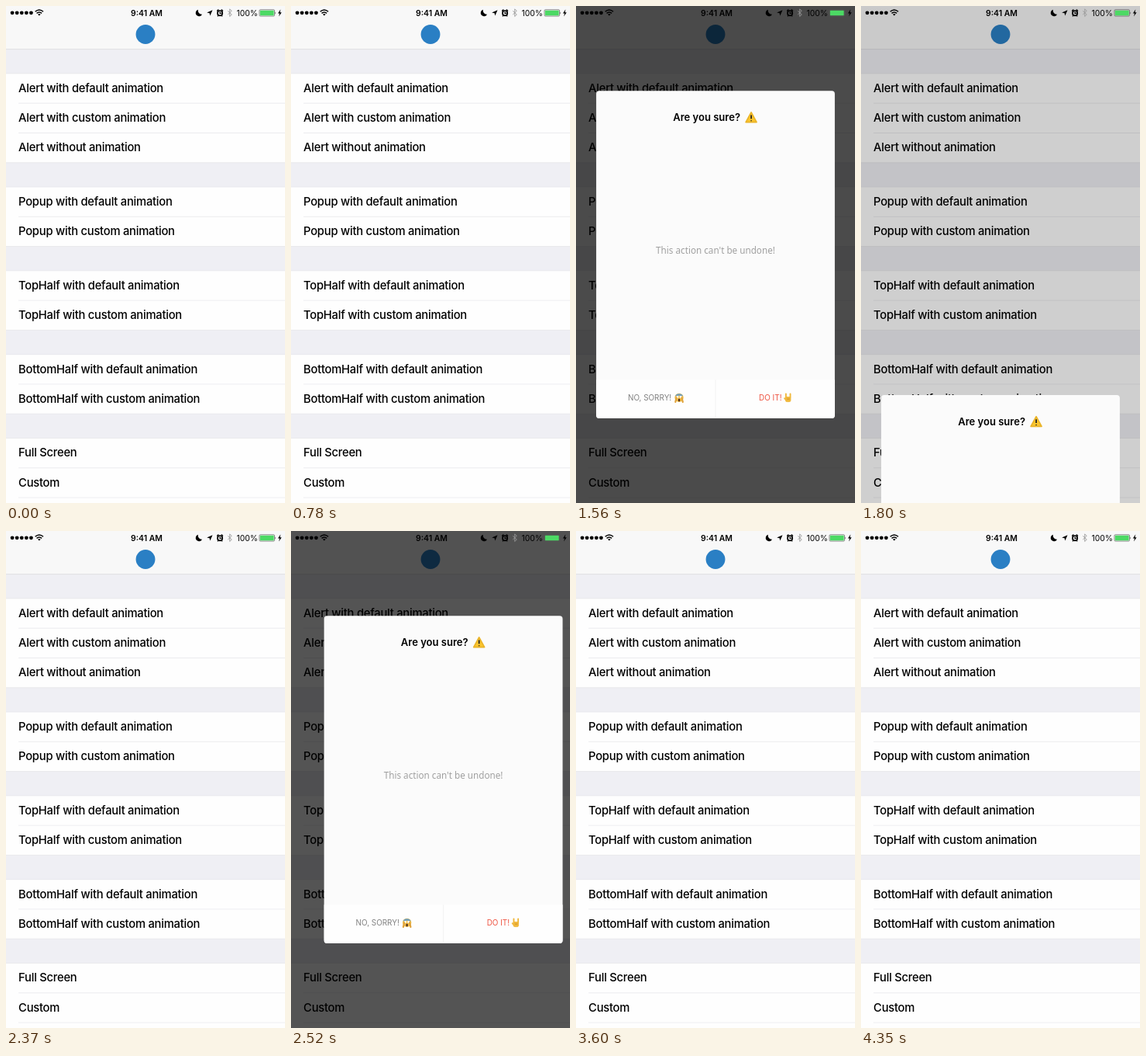
An HTML page for the animation above (4.38 s loop, 360 by 640 pixels).

```html
<!DOCTYPE html>
<html lang="en">
<head>
<meta charset="utf-8">
<title>Alert transitions</title>
<style>
  html, body { margin: 0; width: 100%; height: 100%; overflow: hidden; background: #fff; }
  svg { display: block; width: 100vw; height: 100vh; }
  text { font-family: Inter, "Liberation Sans", sans-serif; }
  .row { font-size: 17px; font-weight: 500; letter-spacing: -.29px; }
  .title { font-size: 15px; font-weight: 600; }
  .body { font: 13.45px "Noto Sans", sans-serif; fill: #a0a0a0; text-anchor: middle; }
  .button { font-size: 11.4px; }
</style>
</head>
<body>
<svg viewBox="0 0 414 736">
  <rect width="414" height="736" fill="#efeff4"/>
  <rect width="414" height="64" fill="#f8f8f8"/>
  <path d="M0 64H414" stroke="#d4d4d8" stroke-width=".7"/>
  <circle cx="207" cy="42" r="14.3" fill="#2a7fc4"/>
  <g id="list"></g>
  <rect id="dim" width="414" height="736"/>

  <g id="card">
    <rect width="354" height="485" rx="4.5" fill="#fbfbfb"/>
    <path d="M0 428H354V480.500A4.500 4.500 0 0 1 349.500 485H4.500A4.500 4.500 0 0 1 0 480.500Z" fill="#fefefe"/>
    <path d="M177 428V485" stroke="#f2f2f2"/>
    <text class="title" x="114" y="44.500">Are you sure?</text>
    <g transform="translate(230 39.500)">
      <path d="M0-7.500L8 7H-8Z" fill="#fbc52d" stroke="#eab42a" stroke-width="2" stroke-linejoin="round"/>
      <path d="M0-3.500V2M0 4.200V5.600" stroke="#222" stroke-width="2"/>
    </g>
    <text class="body" x="177" y="241.500">This action can't be undone!</text>
    <text class="button" x="47" y="458.500" fill="#808080">NO, SORRY!</text>
    <g transform="translate(123 454.500)">
      <circle r="6.500" fill="#f3c04a"/>
      <path d="M-6-2A6.500 6.500 0 0 1 6-2Q0-4-6-2Z" fill="#6f9fc0"/>
      <g fill="#fff"><circle cx="-2.400" cy="-1" r="1.700"/><circle cx="2.400" cy="-1" r="1.700"/></g>
      <ellipse cy="3.500" rx="1.500" ry="2.300" fill="#532"/>
      <path d="M-5.500 6.500L-4 0M5.500 6.500L4 0" stroke="#dfa23c" stroke-width="2.500" stroke-linecap="round"/>
    </g>
    <text class="button" x="241.500" y="458.500" fill="#ee5340">DO IT!</text>
    <g transform="translate(284.500 454.500)" stroke="#f0b83c" stroke-linecap="round">
      <path d="M-3 0V-5.500M3.500 0V-5.500M-5 1L-2 4" stroke-width="2.200"/>
      <rect x="-3.500" y="-1" width="7.500" height="7" rx="2" fill="#f0b83c"/>
      <path d="M-1 2H2" stroke="#c98a28"/>
    </g>
  </g>

  <g id="status">
    <g id="signal"></g>
    <path d="M43.300 8.300Q49.300 3 55.300 8.300M45.500 10.800Q49.300 7.500 53.100 10.800" fill="none" stroke="#000" stroke-width="1.700"/>
    <path d="M47.200 12.300Q49.300 10.700 51.400 12.300L49.300 14.500Z"/>
    <text x="208.700" y="14.500" font-size="12" font-weight="600" text-anchor="middle">9:41 AM</text>
    <path d="M285 5.500A5 5 0 1 0 291 12.300A5.500 5.500 0 0 1 285 5.500Z"/>
    <path d="M306.500 6L302.800 14.500L302 10.500L298 9.700Z"/>
    <circle cx="317.500" cy="10.500" r="3.600" fill="none" stroke="#000" stroke-width="2"/>
    <path d="M313 7.500L315.500 5.300M322 7.500L319.500 5.300M315 14L314 15.300M320 14L321 15.300M317.500 8.500V10.800H319.500" fill="none" stroke="#000" stroke-width="1.500"/>
    <path d="M329.200 7.300L335 12.700L332 15.500V4.500L335 7.300L329.200 12.700" fill="none" stroke="#999"/>
    <text x="342" y="14.500" font-size="12">100%</text>
    <rect x="376" y="5.500" width="22.500" height="9.500" rx="1.500" fill="none" stroke="#555" stroke-width=".8"/>
    <rect x="377" y="6.500" width="20.500" height="7.500" rx=".5" fill="#4cd964"/>
    <path d="M399.500 8.500Q401.500 10.200 399.500 12Z" fill="#555"/>
    <path d="M407.500 5L403.500 10.800H406L404.800 15.500L409 9.500H406.500Z"/>
  </g>
</svg>
<script>
const $ = id => document.getElementById(id);
const LOOP = 4380, LEFT = 30, TOP = 125.5, DROP = 610.5, SIDE = 384, ROW = 44, GAP = 36;

const sections = [
  ['Alert with default animation', 'Alert with custom animation', 'Alert without animation'],
  ['Popup with default animation', 'Popup with custom animation'],
  ['TopHalf with default animation', 'TopHalf with custom animation'],
  ['BottomHalf with default animation', 'BottomHalf with custom animation'],
  ['Full Screen', 'Custom', '']
];

let y = 100, list = '';
for (const rows of sections) {
  const height = rows.length * ROW;
  list += `<rect y="${y}" width="414" height="${height}" fill="#fefefe"/>`;
  rows.forEach((label, i) => {
    const top = y + i * ROW;
    if (i) list += `<path d="M18.500 ${top}H414" stroke="#e4e4e8" stroke-width=".8"/>`;
    list += `<text class="row" x="18.500" y="${top + 27.5}">${label}</text>`;
  });
  list += `<path d="M0 ${y}H414M0 ${y + height}H414" stroke="#dcdce1" stroke-width=".6"/>`;
  y += height + GAP;
}
$('list').innerHTML = list;
$('signal').innerHTML = [0, 1, 2, 3, 4]
  .map(i => `<circle cx="${9.3 + i * 7}" cy="10.200" r="2.800"/>`).join('');

// Critically damped spring from 0 to 1, released at `start`
function spring(t, start) {
  const u = Math.max(0, t - start) * .036;
  return 1 - (1 + u) * Math.exp(-u);
}

function draw() {
  const t = performance.now() % LOOP;
  const first = t < 2300;
  const shown = spring(t, first ? 780 : 2389);
  const gone = spring(t, first ? 1728 : 3000);
  const dx = first ? 0 : SIDE * (1 - shown);
  const dy = first ? DROP * (1 - shown + gone) : -DROP * gone;
  $('card').setAttribute('transform', `translate(${LEFT + dx} ${TOP + dy})`);
  $('dim').setAttribute('opacity', .7 * Math.max(0, shown - gone));
  requestAnimationFrame(draw);
}
draw();
</script>
</body>
</html>
```
